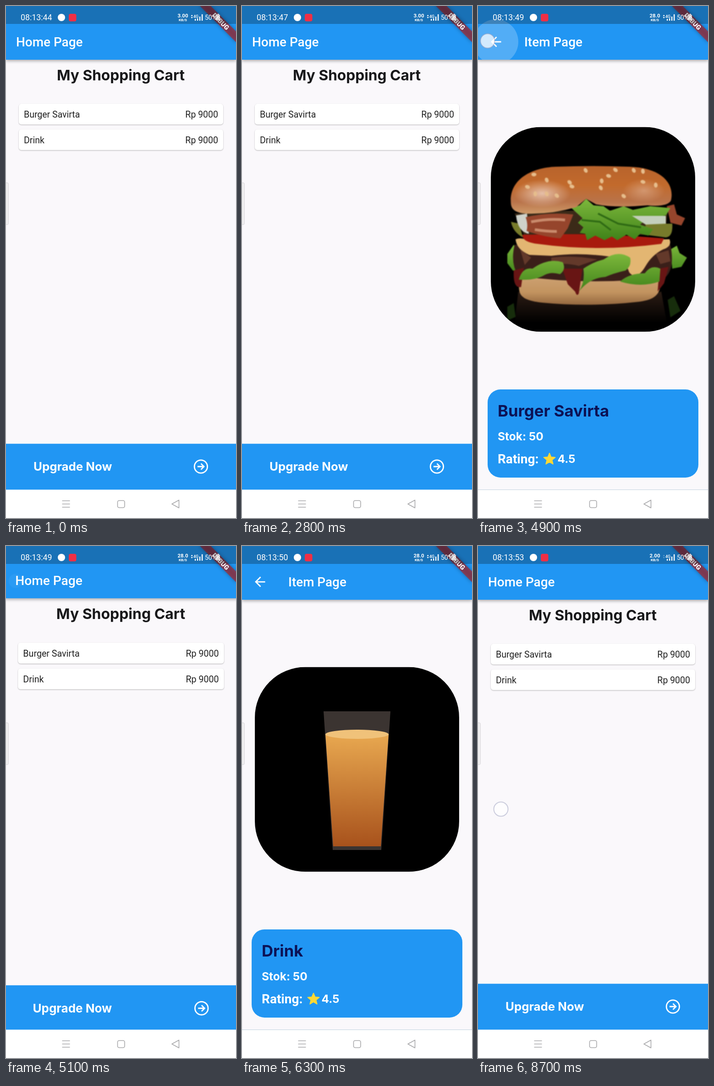
These frames come from a looping animation (502x1115 px, 8.8 s). An HTML page:

```html
<!DOCTYPE html>
<html lang="en">
<head>
<meta charset="utf-8">
<title>Shopping cart</title>
<style>
html, body { margin: 0; width: 100%; height: 100%; overflow: hidden; background: #fff; }
svg { display: block; width: 100vw; height: 100vh; }
text { font-family: Roboto, sans-serif; white-space: pre; }
.title { font-size: 27.9px; font-weight: 500; fill: #fff; }
.geo { font-family: Inter, sans-serif; font-weight: 650; }
.row { font-size: 19.5px; fill: #212121; }
.bar { fill: #2196f3; }
.lift { filter: drop-shadow(0 3px 3px rgba(0, 0, 0, .3)); }
.card { fill: #fff; filter: drop-shadow(0 1.4px 1px rgba(0, 0, 0, .28)); }
.line { fill: none; stroke: #fff; stroke-width: 2.8; }
.end { text-anchor: end; }
.mid { text-anchor: middle; }
#burger { filter: blur(1px); }
</style>
</head>
<body>
<svg viewBox="0 0 502 1115" preserveAspectRatio="none">
  <defs>
    <clipPath id="screen"><rect width="502" height="1053.500"/></clipPath>
    <clipPath id="header"><rect width="502" height="117"/></clipPath>
    <clipPath id="frame"><rect x="28" y="263.500" width="446" height="446" rx="110"/></clipPath>
    <linearGradient id="crust" x2="0" y2="1">
      <stop stop-color="#b8632c"/><stop offset=".4" stop-color="#c26a2c"/>
      <stop offset=".75" stop-color="#b9734a"/><stop offset="1" stop-color="#cf9a68"/>
    </linearGradient>
    <linearGradient id="heel" x2="0" y2="1">
      <stop stop-color="#cfa374"/><stop offset=".6" stop-color="#c2935f"/><stop offset="1" stop-color="#94683f"/>
    </linearGradient>
    <linearGradient id="mirror" x2="0" y2="1">
      <stop stop-color="#2c1c14"/><stop offset="1" stop-color="#000"/>
    </linearGradient>
    <linearGradient id="leaf" x2="0" y2="1">
      <stop stop-color="#7db83c"/><stop offset="1" stop-color="#3f8219"/>
    </linearGradient>
    <radialGradient id="shine">
      <stop stop-color="#f0d4c4" stop-opacity=".8"/><stop offset="1" stop-color="#f0d4c4" stop-opacity="0"/>
    </radialGradient>
    <linearGradient id="juice" x2="0" y2="1">
      <stop stop-color="#e8a850"/><stop offset="1" stop-color="#a8521c"/>
    </linearGradient>
  </defs>

  <g clip-path="url(#screen)">
    <g id="home">
      <rect width="502" height="1054" fill="#faf8fb"/>
      <rect class="bar lift" width="502" height="117"/>
      <text class="title" x="22" y="88">Home Page</text>
      <text class="geo mid" x="250.500" y="162" font-size="31.700" fill="#18181a">My Shopping Cart</text>
      <rect class="card" x="28" y="213" width="446" height="45" rx="5.600"/>
      <rect class="card" x="28" y="268.700" width="446" height="45" rx="5.600"/>
      <text class="row" x="39" y="243">Burger Savirta</text>
      <text class="row end" x="463" y="243">Rp 9000</text>
      <text class="row" x="39" y="298.500">Drink</text>
      <text class="row end" x="463" y="298.500">Rp 9000</text>
      <rect class="bar" y="953.300" width="502" height="101"/>
      <text class="geo" x="60" y="1012" font-size="25.800" fill="#fff">Upgrade Now</text>
      <circle class="line" cx="425.400" cy="1003" r="14.200"/>
      <path class="line" d="M418 1003h14m-6.500-6.500 6.500 6.500-6.500 6.500"/>
    </g>

    <rect id="scrim" width="502" height="1054"/>

    <g id="item">
      <rect width="502" height="1053.500" fill="#faf8fb"/>
      <rect class="bar lift" width="502" height="117"/>
      <circle id="ripple" cx="39" cy="78" fill="#fff" opacity=".22" clip-path="url(#header)"/>
      <path class="line" d="M50.500 78H30m10.500-10.500L30 78l10.500 10.500"/>
      <text class="title" x="101" y="88">Item Page</text>

      <g clip-path="url(#frame)">
        <rect x="28" y="263.500" width="446" height="446"/>
        <g id="burger">
          <path fill="url(#mirror)" d="M88 622Q245 670 400 622L412 690H80Z"/>
          <path fill="#172d0c" d="M64 655l14-8 4 30-18 8zM414 640l14-8 14 32-22 14z"/>
          <path fill="url(#leaf)" d="M64 540l14-20 16 24 6 40-24-8-12-16zM420 530l14-8 6 16 16 10-12 20-20 4z"/>
          <path fill="url(#heel)" d="M94 584C82 630 92 640 140 646Q245 656 352 644C394 638 402 622 397 584Z"/>
          <path fill="#3a1f19" d="M80 520H420Q430 570 410 590Q250 610 88 588Q70 560 80 520Z"/>
          <path fill="#63392a" d="M160 548q50-6 100 4l-40 14q-30-8-60-2zM388 540l28-8 4 24-22 6zM92 530l24 18-14 16z"/>
          <path fill="#681514" d="M78 576l22-6-6 42q-18 4-16-36zM184 572h44l-8 54q-4 8-8-4l-16-16zM396 572l20-4-10 36-14 18z"/>
          <path fill="#e3b672" d="M82 508Q95 502 120 514L418 508Q424 524 404 530Q380 542 366 566Q346 600 330 580Q322 552 290 546Q220 536 160 544L112 542Q84 530 82 508Z"/>
          <path fill="#a81a0e" d="M97 498Q240 492 406 506L400 518Q260 536 130 518Q96 514 97 498Z"/>
          <path fill="url(#leaf)" d="M89 596q8-28 30-24 34-24 66-14 8 16-6 26-20-6-34 2-20 12-56 10zM220 622q14-20 10-50 20-14 44-20 32-22 58-4 4 18-10 28-26 6-44 14-34 2-58 32zM310 600q20-18 54-18 14-20 34-10l-2 28q-40 14-86 0z"/>
          <path fill="#3b2a18" d="M80 452Q240 440 414 448L408 500Q250 494 100 498Z"/>
          <path fill="#777b2b" d="M72 470l18 4 8 30q-22-12-26-34zM366 474h58q2 28-14 30l-46-6z"/>
          <path fill="#cfd2ca" d="M83 456l24-4 4 44q-24-4-28-40z"/>
          <path fill="#96452c" d="M104 460q50-12 104-6l-12 30-16 22q-32-2-74-16 4-14-2-30zM412 436l16-4 6 22 18 8-8 16-24-6z"/>
          <path fill="none" stroke="#c98a6c" stroke-width="6" d="M116 470q40-8 74-4M124 487q26 4 48 4"/>
          <path fill="url(#leaf)" d="M204 440l18-6 14-14 16 14 22 2 14 10 30-10 20 8 38-8 44 4-10 16-40 6-16 14 28 10-10 14-18-4-12 12-18-10-20 12-12-8-16 8-20-10-18 10-4-14-12-2 8-12-12-10 10-10z"/>
          <path fill="none" stroke="#2f6a14" stroke-width="4" d="M226 466l40 4 24 18M262 452l44 22 50 8"/>
          <path fill="#c4cfbc" d="M336 457h74v17l-44 2z"/>
          <path fill="url(#crust)" d="M72 432C66 380 114 352 170 350Q250 347 330 350C402 352 430 388 421 424Q412 438 370 434Q300 440 258 432L236 420 214 438Q160 454 104 452Q74 450 72 432Z"/>
          <ellipse cx="140" cy="408" rx="62" ry="30" fill="url(#shine)"/>
          <ellipse cx="362" cy="402" rx="46" ry="26" fill="url(#shine)" opacity=".5"/>
          <g id="seeds" fill="#e6bd8c"/>
        </g>
        <g id="drink">
          <path fill="#3b3431" d="M178 360H324L304 662H198Z"/>
          <path fill="url(#juice)" d="M182 410H320L303 654H199Z"/>
          <ellipse cx="251" cy="410" rx="69" ry="10" fill="#f0c27a"/>
        </g>
      </g>

      <rect class="bar" x="21" y="835" width="460" height="192" rx="28"/>
      <text id="name" class="geo" x="43" y="894" font-size="34.700" fill="#0c1255"></text>
      <text class="geo" x="43" y="946" font-size="24.500" fill="#fff">Stok: 50</text>
      <text x="43" y="996" font-size="28" font-weight="700" fill="#fff">Rating:</text>
      <path id="star" fill="#fdd835" stroke="#fdd835" stroke-width="2" stroke-linejoin="round"/>
      <text class="geo" x="173.500" y="995" font-size="24.500" fill="#fff">4.5</text>
    </g>

    <g transform="translate(502) rotate(45)">
      <rect x="-56" y="39" width="112" height="16.700" fill="#b71c1c" fill-opacity=".63" style="filter:drop-shadow(0 0 4px rgba(0,0,0,.5))"/>
      <text class="mid" y="52.300" font-size="14.200" font-weight="900" fill="#fff">DEBUG</text>
    </g>
  </g>

  <rect width="502" height="39" opacity=".25"/>
  <g fill="#fff">
    <text id="clock" x="32" y="31.300" font-size="17.800"></text>
    <circle cx="121" cy="25" r="8"/>
    <rect x="137" y="17" width="16.500" height="16.500" rx="4" fill="#ef2f45"/>
    <g class="mid" font-weight="700">
      <text id="speed" x="386" y="25.300" font-size="11.500"></text>
      <text x="386" y="33" font-size="8">KB/S</text>
    </g>
    <path id="arrows" d="M403.500 22l2.200-3 2.200 3zm0 2h4.400l-2.200 3z"/>
    <text x="409" y="25.500" font-size="9" font-weight="500">4G</text>
    <path d="M412 28h2.300v4H412zm5 -1h2.300v5H417zm5-4h2.300v9H422zm5-5h2.300v14H427z"/>
    <text x="434" y="30" font-size="14">50%</text>
    <path opacity=".75" d="M459 19h2v-2h4v2h2v12h-8z"/>
  </g>

  <rect y="1053.500" width="502" height="62" fill="#fff"/>
  <g fill="none" stroke="#a9a9ab" stroke-width="1.600">
    <path d="M122.500 1077.500h17m-17 7h17m-17 7h17M377.500 1076v17l-15.500-8.500z" stroke-linejoin="round"/>
    <rect x="243.500" y="1077" width="15.500" height="15.500" rx="3.500"/>
  </g>
  <rect x="-5" y="385" width="10.300" height="91" rx="2.500" fill="#eee" fill-opacity=".75" stroke="#c8c8cc" stroke-opacity=".75"/>
  <circle id="touch" r="15.500" fill="#fff" fill-opacity=".75" stroke="#9a9dbd" stroke-opacity=".5" stroke-width="2"/>
</svg>

<script>
const LOOP = 8800, ZOOM = 300, FADE = 150;
const $ = id => document.getElementById(id);
const set = (id, attrs) => { for (const k in attrs) $(id).setAttribute(k, attrs[k]); };
const clamp = v => Math.max(0, Math.min(1, v));
const ramp = (t, from, to) => clamp((t - from) / (to - from));

const visits = [
  { name: 'Burger Savirta', art: 'burger', open: 3684, press: 4640, close: 4960 },
  { name: 'Drink', art: 'drink', open: 6030, press: 6600, close: 6833 }
];
// x, y, finger down, finger up
const touches = [
  [109, 238, 3500, 3684], [21, 76, 4560, 4960], [122, 289, 5820, 6030],
  [36.5, 83, 6540, 6830], [50, 573, 8510, 9999]
];

function bezier(x, x1, y1, x2, y2) {
  const at = (u, a, b) => 3 * u * (1 - u) ** 2 * a + 3 * u * u * (1 - u) * b + u ** 3;
  let lo = 0, hi = 1;
  for (let i = 0; i < 24; i++) {
    const m = (lo + hi) / 2;
    if (at(m, x1, x2) < x) lo = m; else hi = m;
  }
  return at(lo, y1, y2);
}

// Two-part page zoom easing
function zoomEase(p) {
  const cut = 1 / 6;
  return p < cut
    ? .4 * bezier(p / cut, .05, 0, .1333, .06)
    : .4 + .6 * bezier((p - cut) / (1 - cut), .2083, .82, .25, 1);
}

const zoom = s => `translate(251 526.5) scale(${s}) translate(-251 -526.5)`;

function drawPages(t) {
  let homeScale = 1, itemScale = 1, alpha = 0, shade = 0;
  const visit = visits.find(v => t >= v.open && t < v.close + ZOOM);
  if (visit) {
    const closing = t >= visit.close;
    const p = clamp((t - (closing ? visit.close : visit.open)) / ZOOM);
    const e = zoomEase(p);
    homeScale = closing ? 1.1 - .1 * e : 1 + .05 * e;
    itemScale = closing ? 1 - .1 * e : .85 + .15 * e;
    alpha = closing ? 1 - ramp(p, .0825, .2075) : ramp(p, .125, .25);
    shade = closing ? 0 : .6 * ramp(p, .2075, .4175);
    $('name').textContent = visit.name;
    for (const v of visits) set(v.art, { display: v === visit ? 'inline' : 'none' });
    set('ripple', { r: 49 * ramp(t, visit.press, visit.press + 200) });
  }
  set('home', { transform: zoom(homeScale) });
  set('scrim', { opacity: shade });
  set('item', { transform: zoom(itemScale), opacity: alpha, display: alpha ? 'inline' : 'none' });
}

function drawTouch(t) {
  const hit = touches.find(([, , down, up]) => t >= down && t < up + FADE);
  if (!hit) return set('touch', { opacity: 0 });
  const [cx, cy, down, up] = hit;
  set('touch', { cx, cy, opacity: ramp(t, down, down + 100) * (1 - ramp(t, up, up + FADE)) });
}

function draw(now) {
  const t = now % LOOP;
  drawPages(t);
  drawTouch(t);
  $('clock').textContent = '08:13:' + (44 + Math.floor((t + 400) / 1000));
  $('speed').textContent = t < 3300 ? '3.00' : t < 7600 ? '28.0' : '2.00';
  set('arrows', { opacity: t < 7600 ? 1 : .3 });
  requestAnimationFrame(draw);
}

const seeds = [
  [122, 367], [150, 379], [200, 384], [108, 394], [125, 409], [150, 409], [172, 413],
  [205, 393], [270, 381], [268, 396], [318, 414], [360, 383], [388, 390], [340, 358],
  [300, 357], [285, 370], [360, 360], [235, 358]
];
$('seeds').innerHTML = seeds.map(([x, y], i) =>
  `<ellipse rx="5.5" ry="4" transform="translate(${x} ${y}) rotate(${i * 67 % 90})"/>`).join('');

const points = Array.from({ length: 10 }, (_, i) => {
  const r = i % 2 ? 5.8 : 13, a = (i * 36 - 90) * Math.PI / 180;
  return [156 + r * Math.cos(a), 987 + r * Math.sin(a)];
});
set('star', { d: 'M' + points.join('L') + 'Z' });

requestAnimationFrame(draw);
</script>
</body>
</html>
```
